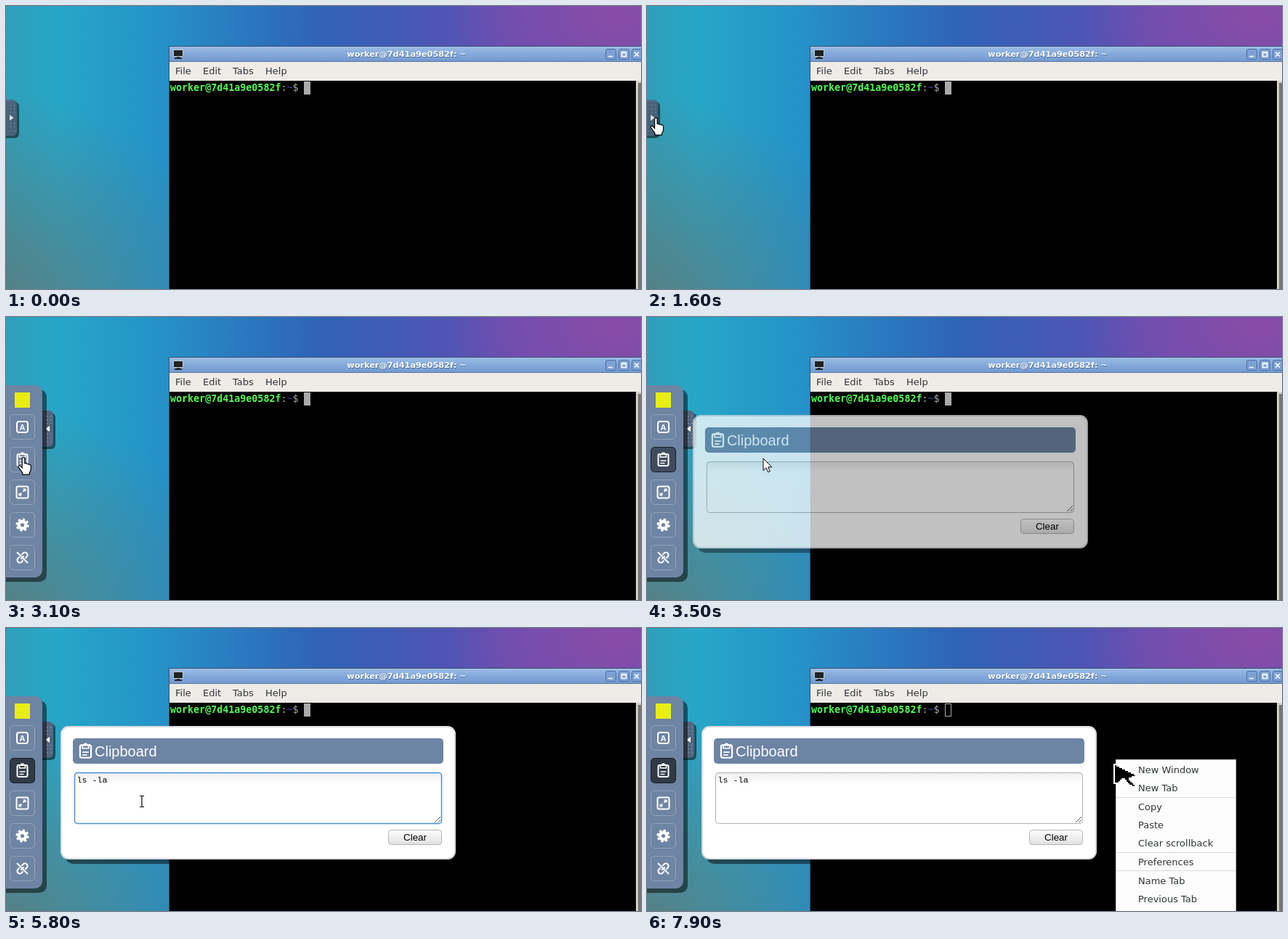
An HTML page for the animation above (8000 ms loop, 874 by 390 pixels).

```html
<!DOCTYPE html>
<html lang="en">
<head>
<meta charset="utf-8">
<title>Remote desktop clipboard</title>
<style>
html, body { margin: 0; width: 100%; height: 100%; overflow: hidden; }
body {
  background:
    radial-gradient(ellipse 300px 300px at 0 420px, rgba(95,120,120,.85), rgba(95,120,120,0)),
    radial-gradient(ellipse 230px 130px at 840px 15px, rgba(140,75,166,.9), rgba(140,75,166,0)),
    linear-gradient(90deg, #2f9fb8 0, #27a6c8 70px, #2494c8 200px, #2a7cc0 310px, #2f63b8 430px, #4a56b5 580px, #664fb2 700px, #6a4fb0 874px);
}
svg { display: block; }
text { white-space: pre; }
.ui { font: 13px "DejaVu Sans", sans-serif; fill: #2e3436; }
.title { font: bold 11.3px "DejaVu Sans", sans-serif; text-anchor: middle; }
.term { font: 13.33px "DejaVu Sans Mono", monospace; fill: #aaa; }
.panel { font: 13.33px "Liberation Sans", Arial, sans-serif; }
.icon { fill: none; stroke: #fff; stroke-width: 2; }
</style>
</head>
<body>
<svg width="874" height="390" viewBox="0 0 874 390">
  <defs>
    <linearGradient id="titleFill" x2="0" y2="1"><stop stop-color="#9dbde6"/><stop offset=".5" stop-color="#83a8d9"/><stop offset="1" stop-color="#7399d0"/></linearGradient>
    <linearGradient id="fieldFill" x2="0" y2="1"><stop stop-color="#eee"/><stop offset=".2" stop-color="#fff"/></linearGradient>
    <linearGradient id="buttonFill" x2="0" y2="1"><stop stop-color="#fff"/><stop offset="1" stop-color="#e0e0e0"/></linearGradient>
    <pattern id="dots" width="5" height="5" patternUnits="userSpaceOnUse"><rect x="1" y="1" width="1.3" height="1.3" fill="#8ba0bd"/></pattern>
    <g id="clipboard" class="icon">
      <rect x="-7" y="-7" width="14" height="16" rx="2"/>
      <path d="M-4-3V-7h2a2 2 0 0 1 4 0h2v4zM-4 2H4M-4 5.5H2" stroke-width="1.6"/>
    </g>
    <g id="winButton"><rect width="14" height="14" rx="2" fill="#7da1d4" stroke="#4d6f9f"/></g>
  </defs>

  <!-- Terminal window -->
  <rect x="224" y="55" width="660" height="350" fill="#3d4f6b"/>
  <rect x="225" y="56" width="650" height="21" fill="url(#titleFill)"/>
  <path d="M225 76.5H874" stroke="#56779f"/>
  <rect x="230" y="60" width="14" height="10" rx="1" fill="#c8c8c4"/>
  <rect x="231" y="61" width="12" height="8" fill="#1d2326"/>
  <path d="M235 70h4v1h3v2H232v-2h3z" fill="#24282b"/>
  <text class="title" x="552" y="71" fill="#46658f">worker@7d41a9e0582f: ~</text>
  <text class="title" x="551.5" y="70" fill="#fff">worker@7d41a9e0582f: ~</text>
  <use href="#winButton" x="825.5" y="59.5"/><use href="#winButton" x="843.5" y="59.5"/><use href="#winButton" x="861.5" y="59.5"/>
  <path d="M829 69.5h6M847.5 63.5h6v6h-6zM847 64.5h7M865 63.500l6 6m0-6l-6 6" fill="none" stroke="#fff" stroke-width="1.7"/>
  <rect x="225" y="77" width="650" height="26" fill="#efebe7"/>
  <g class="ui">
    <text x="233" y="94">File</text><text x="271" y="94">Edit</text><text x="312" y="94">Tabs</text><text x="357" y="94">Help</text>
  </g>
  <rect x="225" y="103" width="642" height="287"/>
  <rect x="867" y="103" width="7" height="287" fill="#d3cfcb"/>
  <rect x="870" y="106" width="4" height="284" fill="#777573"/>
  <text class="term" x="226" y="117"><tspan fill="#54ff54" font-weight="bold">worker@7d41a9e0582f</tspan>:<tspan fill="#4048a0">~</tspan>$</text>
  <rect id="block" x="410.500" y="104.500" width="8" height="17" stroke="#aaa"/>
  <g id="menu" class="ui">
    <rect x="645.5" y="181.5" width="165" height="220" fill="#fdfdfd" stroke="#c4c4c4"/>
    <path d="M646 233.5H810M646 309.500H810M646 334.500H810" stroke="#dcdcdc"/>
  </g>

  <!-- Control bar -->
  <g id="bar">
    <path d="M50 132h12a6 6 0 0 1 6 6v38a6 6 0 0 1-6 6H50z" fill="#000" opacity=".5"/>
    <g id="handle">
      <path d="M50 129h9a6 6 0 0 1 6 6v38a6 6 0 0 1-6 6H50z" fill="#53667f"/>
      <path d="M52 133h12v43H52z" fill="url(#dots)"/>
      <rect x="52" y="147" width="12" height="14" fill="#53667f"/>
      <path id="arrow" d="M-2.500-4L3 0L-2.500 4z" fill="#fff"/>
    </g>
    <path id="barShadow" d="M-10 100H46a10 10 0 0 1 10 10V355a10 10 0 0 1-10 10H-10z"/>
    <path d="M-10 94H40a10 10 0 0 1 10 10V349a10 10 0 0 1-10 10H-10z" fill="#6e84a3"/>
    <rect x="12" y="104" width="21" height="21" fill="#e8ee10"/>
    <g id="buttons" fill="none" stroke="#fff" stroke-opacity=".25"></g>
    <g class="icon">
      <rect x="15" y="144" width="15" height="15" rx="3"/>
      <text x="22.500" y="155.500" text-anchor="middle" style="font:bold 11px 'Liberation Sans',sans-serif;fill:#fff;stroke:none">A</text>
      <use href="#clipboard" x="22.500" y="196"/>
      <rect x="14.500" y="233.500" width="16" height="16" rx="2"/>
      <path d="M23.500 240.500l3-3M21.500 242.500l-3 3" />
      <path d="M23 236.500h4.500v4.500zM17.500 242v4.500H22z" fill="#fff" stroke="none"/>
      <circle cx="22.500" cy="286.500" r="4.800" stroke-width="4.400"/>
      <circle cx="22.500" cy="286.500" r="7.600" stroke-width="3" stroke-dasharray="3.200 2.770"/>
      <g transform="translate(22.500 331.500) rotate(-45)">
        <path d="M-2-3.500H-5a3.500 3.500 0 0 0 0 7H-2M2-3.500H5a3.500 3.500 0 0 1 0 7H2M-3 0H3"/>
      </g>
      <path d="M15 324l15 15"/>
    </g>
  </g>

  <!-- Clipboard panel -->
  <g id="panel" class="panel">
    <path d="M82 314V315a10 10 0 0 0 10 10H614a10 10 0 0 0 10-10V152a10 10 0 0 0-6-9V309a10 10 0 0 1-10 10H86z" opacity=".5"/>
    <rect x="76" y="136" width="542" height="182" rx="10" fill="#fff" stroke="#d8dadd" stroke-width="2"/>
    <rect x="92" y="152" width="510" height="35" rx="5" fill="#6e84a3"/>
    <use href="#clipboard" transform="translate(109.500 169) scale(1.080)"/>
    <text x="122" y="177" font-size="20" fill="#fff">Clipboard</text>
    <rect id="field" x="94.500" y="199.500" width="505" height="70" rx="4" fill="url(#fieldFill)"/>
    <path d="M590 268l8-8M594.500 268l3.500-3.500" stroke="#555"/>
    <text id="typed" x="97.500" y="213" style="font:11.67px 'Liberation Mono',monospace"></text>
    <rect id="caret" y="202" width="1" height="13"/>
    <rect x="526.500" y="278.500" width="73" height="20" rx="4" fill="url(#buttonFill)" stroke="#b4b4b4"/>
    <text x="563" y="293" text-anchor="middle">Clear</text>
  </g>

  <!-- Pointer shapes, hotspot at 0,0 -->
  <g id="pointer">
    <path id="remoteArrow" d="M0 0h4v2h4v2h4v2h4v2h4v2h4v2h4v2h2v3h-5v2h-4v2h2v2h2v2h2v2h2v4h-5v-2h-4v-2h-2v-2h-2v-3h-2v-2h-3v2h-2v2h-2v2H0z" stroke="#fff" stroke-width="2" shape-rendering="crispEdges"/>
    <path id="remoteBeam" d="M-6-14h4l2 2l2-2h4v3h-4l-1 1v20l1 1h4v3h-4l-2-2l-2 2h-4v-3h4l1-1v-20l-1-1h-4z" stroke="#fff" stroke-width="1.500"/>
    <path id="hand" d="M-1.500 1.500a1.800 1.800 0 0 1 3.600 0V8q2-1 3 .8q2-.8 2.900 .9q2.500-.4 2.500 2V16q0 3-2 5v2.500H-1V21L-6 14q-1.500-2.500 .3-3t4.200 3z" fill="#fff" stroke="#000" stroke-width="1.200"/>
    <path id="localArrow" d="M0 0V16.500l4-3.700l2.600 6l2.700-1.200l-2.600-5.800h5z" fill="#fff" stroke="#000"/>
    <path id="localBeam" d="M-3-7.500h2.500l.5 .5l.5-.5H3M0-7V7M-3 7.500h2.500l.5-.5l.5 .5H3" fill="none" stroke="#000" stroke-width="1.200"/>
  </g>
</svg>
<script>
const $ = id => document.getElementById(id);
const set = (id, attrs) => { for (const k in attrs) $(id).setAttribute(k, attrs[k]); };
const show = (id, on) => { $(id).style.display = on ? '' : 'none'; };
const add = (parent, tag, attrs, text = '') => {
  const el = document.createElementNS('http://www.w3.org/2000/svg', tag);
  for (const k in attrs) el.setAttribute(k, attrs[k]);
  el.textContent = text;
  $(parent).append(el);
  return el;
};

const LOOP = 8000, STEP = 100;
const COMMAND = 'ls -la', KEY_TIMES = [4600, 4700, 4800, 5000, 5200, 5300];
const FOCUS = 4100, BLUR = 7100;

// time, x, y, shape used from that time on
const PATH = [
  [100, 890, 215, 'remoteArrow'], [200, 820, 209, 'remoteBeam'], [800, 224, 158, 'remoteArrow'],
  [1000, 54, 141, 'remoteArrow'], [1400, 12, 154, 'hand'], [1900, 12, 155, 'hand'],
  [2100, 20, 158, 'hand'], [2500, 22, 192, 'hand'], [3200, 24, 194, 'hand'],
  [3300, 60, 194, 'localArrow'], [3500, 160, 195, 'localArrow'], [3800, 178, 225, 'localBeam'],
  [4100, 187, 239, 'localBeam'], [5800, 187, 239, 'localBeam'], [6200, 500, 198, 'localArrow'],
  [6400, 625, 183, 'remoteBeam'], [6500, 644, 181, 'remoteBeam'], [BLUR, 644, 181, 'remoteArrow'],
  [7300, 644, 181, 'remoteArrow'], [7700, 643, 188, 'remoteArrow'],
];
const SHAPES = [...new Set(PATH.map(p => p[3]))];

const buttons = [0, 1, 2, 3, 4].map(i =>
  add('buttons', 'rect', { x: 5.5, y: 134.5 + 45 * i, width: 34, height: 34, rx: 5 }));
[['New Window', 200], ['New Tab', 225], ['Copy', 251], ['Paste', 276], ['Clear scrollback', 301],
 ['Preferences', 327], ['Name Tab', 353], ['Previous Tab', 378]]
  .forEach(([label, y]) => add('menu', 'text', { x: 676, y }, label));

// Half-second ease-in-out starting at the given time
const ease = (t, start) => {
  const u = Math.min(1, Math.max(0, (t - start) / 500));
  return u * u * (3 - 2 * u);
};

function drawPointer(t) {
  const i = PATH.findLastIndex(p => p[0] <= t);
  show('pointer', i >= 0);
  if (i < 0) return;
  const a = PATH[i], b = PATH[i + 1] || a;
  const u = b === a ? 0 : (t - a[0]) / (b[0] - a[0]);
  set('pointer', { transform: `translate(${a[1] + (b[1] - a[1]) * u} ${a[2] + (b[2] - a[2]) * u})` });
  SHAPES.forEach(s => show(s, s === a[3]));
}

function draw(t) {
  const open = ease(t, 1740), turn = ease(t, 1850), slide = ease(t, 3160);
  const focused = t >= FOCUS && t < BLUR;

  set('bar', { transform: `translate(${-50 * (1 - open)} 0)` });
  set('barShadow', { opacity: 0.5 * open });
  set('handle', { opacity: 0.85 + 0.15 * open });
  set('arrow', { transform: `translate(57.5 154) rotate(${-180 * turn})` });
  buttons[0].setAttribute('fill', t >= 2000 && t < 2300 ? 'rgba(255,255,255,.2)' : 'none');
  buttons[1].setAttribute('fill', `rgba(0,0,0,${0.56 * slide})`);
  buttons[1].setAttribute('stroke', slide > 0.5 ? '#000' : '#fff');
  buttons[1].setAttribute('stroke-opacity', slide > 0.5 ? 0.7 : 0.25);

  show('panel', slide > 0);
  set('panel', { opacity: slide, transform: `translate(${-50 * (1 - slide)} 0)` });
  set('field', { stroke: focused ? '#4a8fd0' : '#b0b0b0', 'stroke-width': focused ? 1.5 : 1 });
  const count = KEY_TIMES.filter(k => k <= t).length;
  const lastInput = count ? KEY_TIMES[count - 1] : FOCUS;
  $('typed').textContent = COMMAND.slice(0, count);
  set('caret', { x: 97 + 7 * count });
  show('caret', focused && (t - lastInput) % 1000 < 500);

  show('menu', t >= BLUR);
  set('block', { fill: t >= BLUR ? '#000' : '#aaa' });
  drawPointer(t);
}

function tick() {
  draw(Math.floor(performance.now() % LOOP / STEP) * STEP);
  requestAnimationFrame(tick);
}
tick();
</script>
</body>
</html>
```
